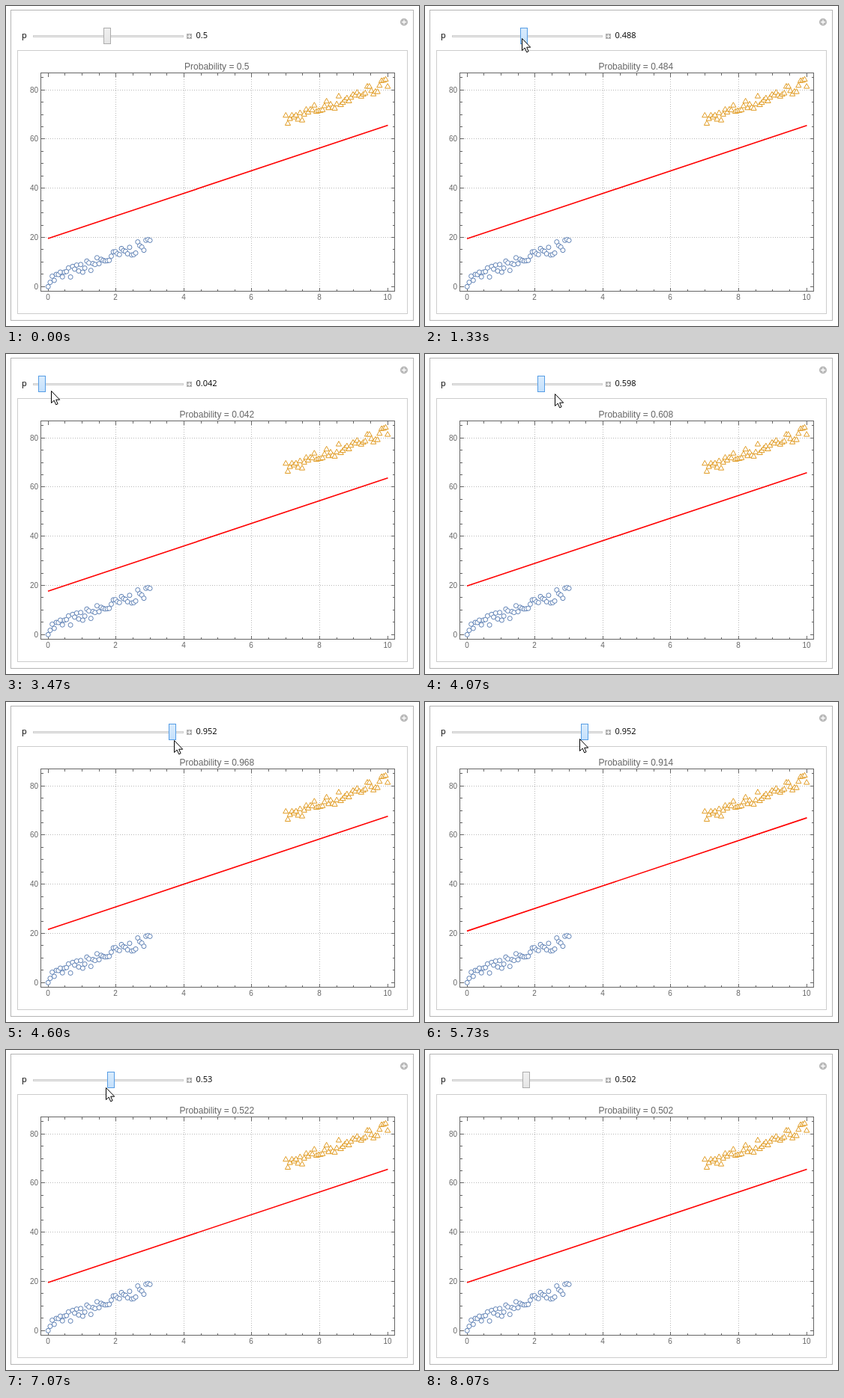
Write an HTML page that moves like this. It is 551x428 px and loops after 9.14 s.

```html
<!DOCTYPE html>
<html lang="en">
<head>
<meta charset="utf-8">
<title>Probability slider</title>
<style>
  html, body { margin: 0; width: 100%; height: 100%; overflow: hidden; background: #fff; }
  svg { display: block; }
  .crisp { shape-rendering: crispEdges; }
  text { font-family: "Liberation Sans", Arial, sans-serif; fill: #666; }
  .ui { font: 11px "Open Sans", "Noto Sans", sans-serif; fill: #000; }
</style>
</head>
<body>
<svg width="551" height="428" viewBox="0 0 551 428">
  <defs>
    <linearGradient id="idle" x2="0" y2="1"><stop stop-color="#f0f0f0"/><stop offset="1" stop-color="#e5e5e5"/></linearGradient>
    <linearGradient id="hover" x2="0" y2="1"><stop stop-color="#ecf4fc"/><stop offset="1" stop-color="#dcecfc"/></linearGradient>
    <linearGradient id="drag" x2="0" y2="1"><stop stop-color="#daecfc"/><stop offset="1" stop-color="#c4e0fc"/></linearGradient>
  </defs>
  <rect class="crisp" x="6.5" y="5.5" width="537" height="415" fill="#fff" stroke="#b4b4b4"/>
  <rect class="crisp" x="15.5" y="59.5" width="520" height="352" fill="#fff" stroke="#ccc"/>
  <circle cx="531" cy="21.5" r="5" fill="#b8b8b8"/>
  <path d="M528 21.5h6M531 18.5v6" stroke="#fff" stroke-width="1.3"/>

  <text class="ui" x="21" y="43">p</text>
  <rect class="crisp" x="36.5" y="39.5" width="200" height="2" fill="#e8e8e8" stroke="#d0d0d0"/>
  <rect class="crisp" x="241" y="37" width="7" height="7" fill="#b0b0b0"/>
  <path d="M242 40.5h5M244.5 38v5" stroke="#fff"/>
  <text class="ui" id="label" x="253.5" y="43"></text>

  <text id="title" x="281.3" y="85" font-size="12" text-anchor="middle"></text>
  <g id="plot"></g>
  <path id="boundary" fill="none" stroke="#f00" stroke-width="1.6"/>
  <rect id="thumb" class="crisp" y="29.5" width="9" height="21"/>
  <path id="cursor" d="M0 0V16L3.7 12.6 6.2 18.3 8.6 17.2 6.2 11.7H11.2Z" fill="#fff" stroke="#000"/>
</svg>
<script>
const LOOP = 9140;
const byId = id => document.getElementById(id);
const pixel = v => Math.floor(v) + .5;
const plotX = x => 56.2 + 45.3 * x;
const plotY = y => 375.33 - 3.289 * y;
const thumbX = p => 39.8 + 190 * p;

let seed = 7;
const random = () => (seed = seed * 16807 % 2147483647) / 2147483647;

function buildPlot() {
  let grid = '', ticks = '', labels = '', markers = '';
  for (let i = 0; i <= 20; i++) {
    const x = pixel(plotX(i / 2)), major = i % 4 === 0, len = major ? 5 : 3;
    ticks += `M${x} 381.5v${-len}M${x} 89.5v${len}`;
    if (!major) continue;
    labels += `<text x="${x - .5}" y="393" text-anchor="middle">${i / 2}</text>`;
    if (i && i < 20) grid += `M${x} 381V90`;
  }
  for (let v = 0; v <= 85; v += 5) {
    const y = pixel(plotY(v)), major = v % 20 === 0, len = major ? 5 : 3;
    ticks += `M46.5 ${y}h${len}M518.5 ${y}h${-len}`;
    if (!major) continue;
    labels += `<text x="43" y="${y + 3}" text-anchor="end">${v}</text>`;
    if (v) grid += `M47 ${y}H518`;
  }
  // Two noisy classes along parallel trends
  for (let i = 0; i <= 50; i++) {
    const x = i * .06, low = 5 * (x + random()), high = 65 + 5 * (x + random());
    markers += `<circle cx="${plotX(x)}" cy="${plotY(low)}" r="3" stroke="#5e81b5"/>
      <path d="M${plotX(7 + x)} ${plotY(high) - 4}l3.6 6.4h-7.2z" stroke="#e19c24"/>`;
  }
  byId('plot').innerHTML =
    `<path class="crisp" d="${grid}" stroke="#b8b8b8" stroke-dasharray="1 2"/>
     <path class="crisp" d="M46.5 89.5H518.5V381.5H46.5Z${ticks}" fill="none" stroke="#666"/>
     <g font-size="10">${labels}</g><g fill="#fff">${markers}</g>`;
}

// Turning points of the drag: time, probability
const dragKeys = [[1200, .5], [1400, .48], [1700, .48], [2270, .216], [2310, .216], [2600, .1],
  [3000, .042], [3510, .042], [4070, .598], [4110, .608], [4200, .79 - .06], [4330, .84], [4670, .98],
  [5430, .98], [5730, .952], [5750, .914], [5770, .914], [6470, .666], [6510, .65], [7200, .502]];
// Pointer: time, offset from the thumb, height
const pointerKeys = [[270, -17, 422], [800, 20, 130], [1070, -2, 44], [2270, -2, 44], [4070, -2, 54],
  [5730, -2, 50], [6470, -2, 54], [7540, -2, 50], [8000, -97, 415]];

function sample(keys, t) {
  const next = keys.findIndex(key => key[0] > t);
  if (next <= 0) return keys[next ? keys.length - 1 : 0].slice(1);
  const a = keys[next - 1], b = keys[next], f = (t - a[0]) / (b[0] - a[0]);
  return a.slice(1).map((v, i) => v + (b[i + 1] - v) * f);
}

const probability = t => Math.round(sample(dragKeys, t)[0] * 500) / 500;
const format = p => String(+p.toFixed(3));

function render(now) {
  // The picture advances fifteen times a second, on 10 ms marks
  const step = Math.floor((now % LOOP + 4) * 15 / 1000);
  const t = Math.round(step * 20 / 3) * 10;

  // Label, thumb, plot and pointer follow the same drag with growing lead
  const p = probability(t + 40);
  byId('label').textContent = format(probability(t));
  byId('title').textContent = 'Probability = ' + format(p);
  const y = 311.1 - 2 * Math.log(p / (1 - p));
  byId('boundary').setAttribute('d', `M56 ${y}L509.5 ${y - 151.5}`);

  const thumb = byId('thumb');
  const state = t < 1000 || t >= 7660 ? 'idle' : t < 1200 || t >= 7400 ? 'hover' : 'drag';
  thumb.setAttribute('x', Math.round(thumbX(probability(t + 20))) - 4.5);
  thumb.setAttribute('fill', `url(#${state})`);
  thumb.setAttribute('stroke', { idle: '#acacac', hover: '#7eb4ea', drag: '#569de5' }[state]);

  const [offset, height] = sample(pointerKeys, t);
  const pointerX = thumbX(probability(t + 120)) + offset;
  const cursor = byId('cursor');
  cursor.setAttribute('transform', `translate(${pixel(pointerX)} ${pixel(height - 1)})`);
  cursor.setAttribute('visibility', t >= 270 && t < 8070 ? 'visible' : 'hidden');
}

buildPlot();
const start = performance.now();
function loop() {
  render(performance.now() - start);
  requestAnimationFrame(loop);
}
loop();
</script>
</body>
</html>
```
